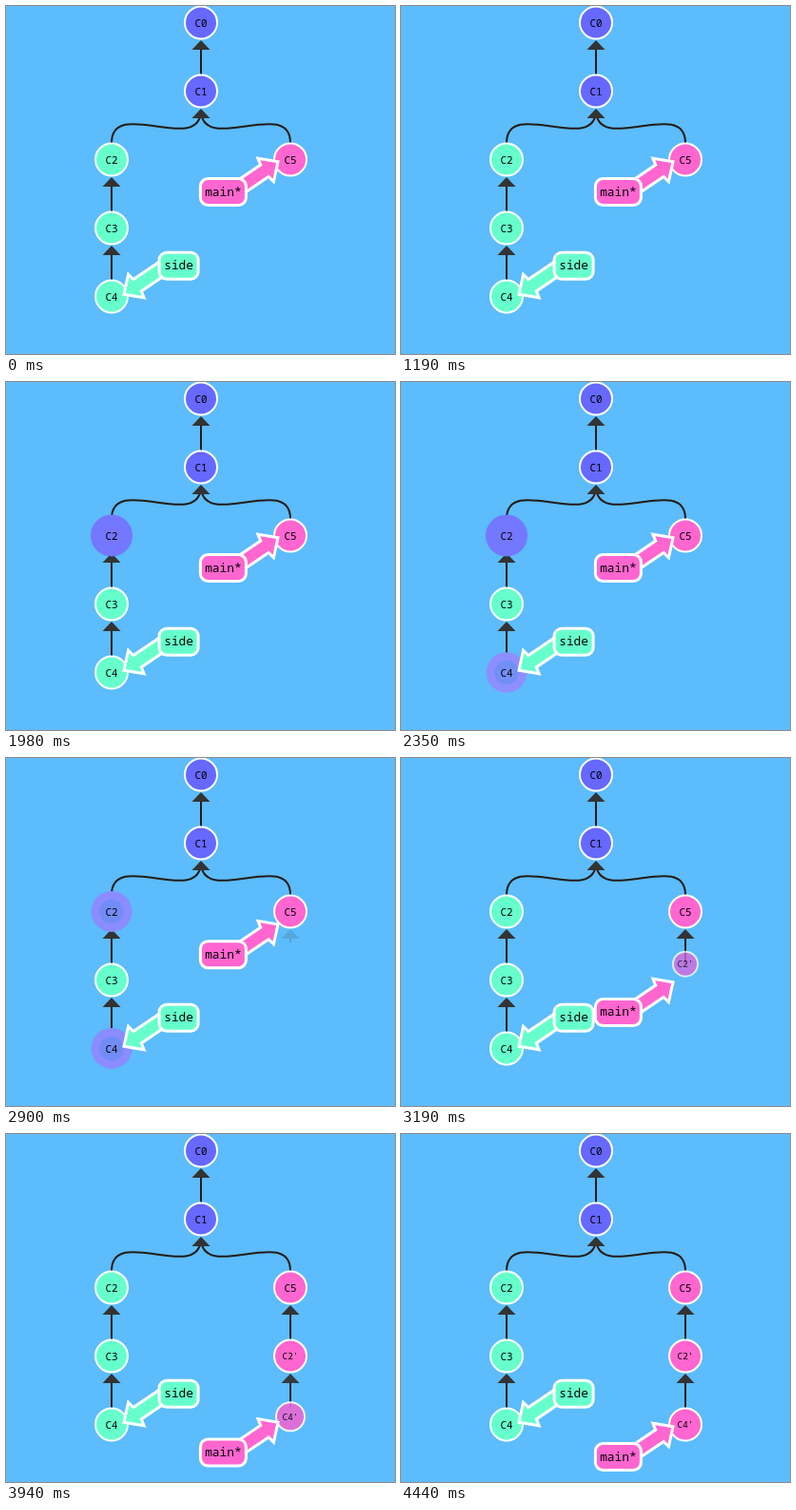
Animation of 409 by 366 pixels, one loop 5740 ms. Source, as an HTML page:

```html
<!DOCTYPE html>
<html lang="en">
<head>
<meta charset="utf-8">
<title>Commit graph</title>
<style>
  html, body { margin: 0; width: 100%; height: 100%; overflow: hidden; background: #5cbcfc; }
  svg { display: block; width: 100vw; height: 100vh; }
  text { font-family: "Noto Sans Mono", "DejaVu Sans Mono", monospace; text-anchor: middle; fill: #000; }
</style>
</head>
<body>
<svg id="stage" viewBox="0 0 409 366"></svg>
<script>
const LOOP = 5740;
const BLUE = [102, 104, 255], GREEN = [102, 255, 204], PINK = [255, 102, 208];
const GLOW = [116, 119, 255], WHITE = [255, 255, 255];
const R = 17, ROW = 72, LEFT = 111, MID = 205, RIGHT = 299;
const rowY = row => 17.5 + row * ROW;

// start times of the four stages
const GLOW_A = 1180, GLOW_B = 1970, BIRTH_A = 2792, BIRTH_B = 3612;
const GLOW_TIME = 540, MOVE_TIME = 400, BOUNCE_TIME = 800;

const stage = document.getElementById("stage");

function set(node, attrs) {
  for (const key in attrs) node.setAttribute(key, attrs[key]);
  return node;
}

function add(parent, tag, attrs = {}) {
  const node = document.createElementNS("http://www.w3.org/2000/svg", tag);
  parent.appendChild(node);
  return set(node, attrs);
}

const rgb = c => `rgb(${c.map(Math.round).join(",")})`;
const lerp = (a, b, k) => a + (b - a) * k;
const mix = (a, b, k) => a.map((v, i) => lerp(v, b[i], k));
const progress = (t, start, span) => Math.min(1, Math.max(0, (t - start) / span));

function ease(n) {
  if (n <= 0 || n >= 1) return n;
  const q = 0.48 - n / 1.04, w = Math.sqrt(0.1734 + q * q);
  const s = Math.cbrt(w - q) + Math.cbrt(-w - q) + 0.5;
  return (1 - s) * 3 * s * s + s * s * s;
}

function bounce(n) {
  const k = 7.5625, p = 2.75;
  if (n < 1 / p) return k * n * n;
  if (n < 2 / p) return k * (n - 1.5 / p) ** 2 + 0.75;
  if (n < 2.5 / p) return k * (n - 2.25 / p) ** 2 + 0.9375;
  return k * (n - 2.625 / p) ** 2 + 0.984375;
}

const edgeLayer = add(stage, "g", { stroke: "#221c14", "stroke-width": 2, fill: "none" });
const commitLayer = add(stage, "g");
const labelLayer = add(stage, "g");

function head(parent, x, y) {
  add(parent, "path", { d: `M${x} ${y}l9.5 10h-19z`, fill: "#333", stroke: "none" });
}

// edge from the given row up to the row above
function edge(x, row) {
  const g = add(edgeLayer, "g");
  const tip = rowY(row - 1) + 18.5;
  const line = add(g, "path", { d: `M${x} ${tip + 5}V${rowY(row) - R}` });
  head(g, x, tip);
  return { g, line, x, tip, end: rowY(row) - R };
}

function fork(x) {
  add(edgeLayer, "path", { d: `M${x} 144C${x} 95 ${MID} 158 ${MID} 109` });
}

function commit(name, x, row, color) {
  const g = add(commitLayer, "g");
  const circle = add(g, "circle", { cx: x, cy: rowY(row), r: R, fill: rgb(color), stroke: "#fff", "stroke-width": 2 });
  const size = name.length > 2 ? 9.4 : 11;
  const text = add(g, "text", { x, y: rowY(row) + 4, "font-size": size, "font-weight": 500 });
  text.textContent = name;
  return { g, circle, text, row, color };
}

// side is 1 when the label lies left of its commit, -1 when right
function label(name, x, row, color, side, width) {
  const g = add(labelLayer, "g", { fill: rgb(color), stroke: "#fff", "stroke-width": 3 });
  const y = rowY(row), turn = side > 0 ? -34 : 146;
  add(g, "path", {
    d: "M0 0L-15.5 -14.8L-17 -7.5H-52V7.5H-17L-15.5 14.8Z",
    transform: `translate(${x - 13 * side} ${y + 2.3 * side}) rotate(${turn})`
  });
  const cx = x - 70.6 * side, cy = y + (side > 0 ? 34 : -32.3);
  add(g, "rect", { x: cx - width / 2, y: cy - 14, width, height: 28, rx: 8 });
  const text = add(g, "text", { x: cx, y: cy + 4, "font-size": 12.85, fill: "#000", stroke: "none" });
  text.textContent = name;
  return g;
}

fork(LEFT);
fork(RIGHT);
head(edgeLayer, MID, rowY(1) + 18.5);
edge(MID, 1);
edge(LEFT, 3);
edge(LEFT, 4);
const edgeA = edge(RIGHT, 3), edgeB = edge(RIGHT, 4);

// new commits come out from behind their parents
const copyB = commit("C4'", RIGHT, 4, PINK);
const copyA = commit("C2'", RIGHT, 3, PINK);
commit("C0", MID, 0, BLUE);
commit("C1", MID, 1, BLUE);
const pickA = commit("C2", LEFT, 2, GREEN);
commit("C3", LEFT, 3, GREEN);
const pickB = commit("C4", LEFT, 4, GREEN);
commit("C5", RIGHT, 2, PINK);

label("side", LEFT, 4, GREEN, -1, 41);
const mainLabel = label("main*", RIGHT, 2, PINK, 1, 48);

function glow(node, k) {
  set(node.circle, {
    fill: rgb(mix(node.color, GLOW, k)),
    stroke: rgb(mix(WHITE, GLOW, k)),
    "stroke-width": lerp(2, 10, k)
  });
}

function birth(node, link, t, start) {
  const k = bounce(progress(t, start, BOUNCE_TIME));
  const y = lerp(rowY(node.row - 1), rowY(node.row), k);
  set(node.g, { opacity: k, visibility: t < start ? "hidden" : "visible" });
  set(node.circle, { cy: y, r: R * k, fill: rgb(mix(BLUE, node.color, k)) });
  set(node.text, { y: y + 3.5 });

  const e = ease(progress(t, start, MOVE_TIME));
  set(link.g, { opacity: e });
  set(link.line, { d: `M${link.x} ${link.tip + 5}V${lerp(link.tip + 10, link.end, e)}` });
}

function draw(t) {
  const moveA = ease(progress(t, BIRTH_A, MOVE_TIME));
  const moveB = ease(progress(t, BIRTH_B, MOVE_TIME));
  glow(pickA, ease(progress(t, GLOW_A, GLOW_TIME)) * (1 - moveA));
  glow(pickB, ease(progress(t, GLOW_B, GLOW_TIME)) * (1 - moveA));
  birth(copyA, edgeA, t, BIRTH_A);
  birth(copyB, edgeB, t, BIRTH_B);
  set(mainLabel, { transform: `translate(0 ${ROW * (moveA + moveB)})` });
}

const begin = performance.now();
function tick() {
  draw((performance.now() - begin) % LOOP);
  requestAnimationFrame(tick);
}
tick();
</script>
</body>
</html>
```
